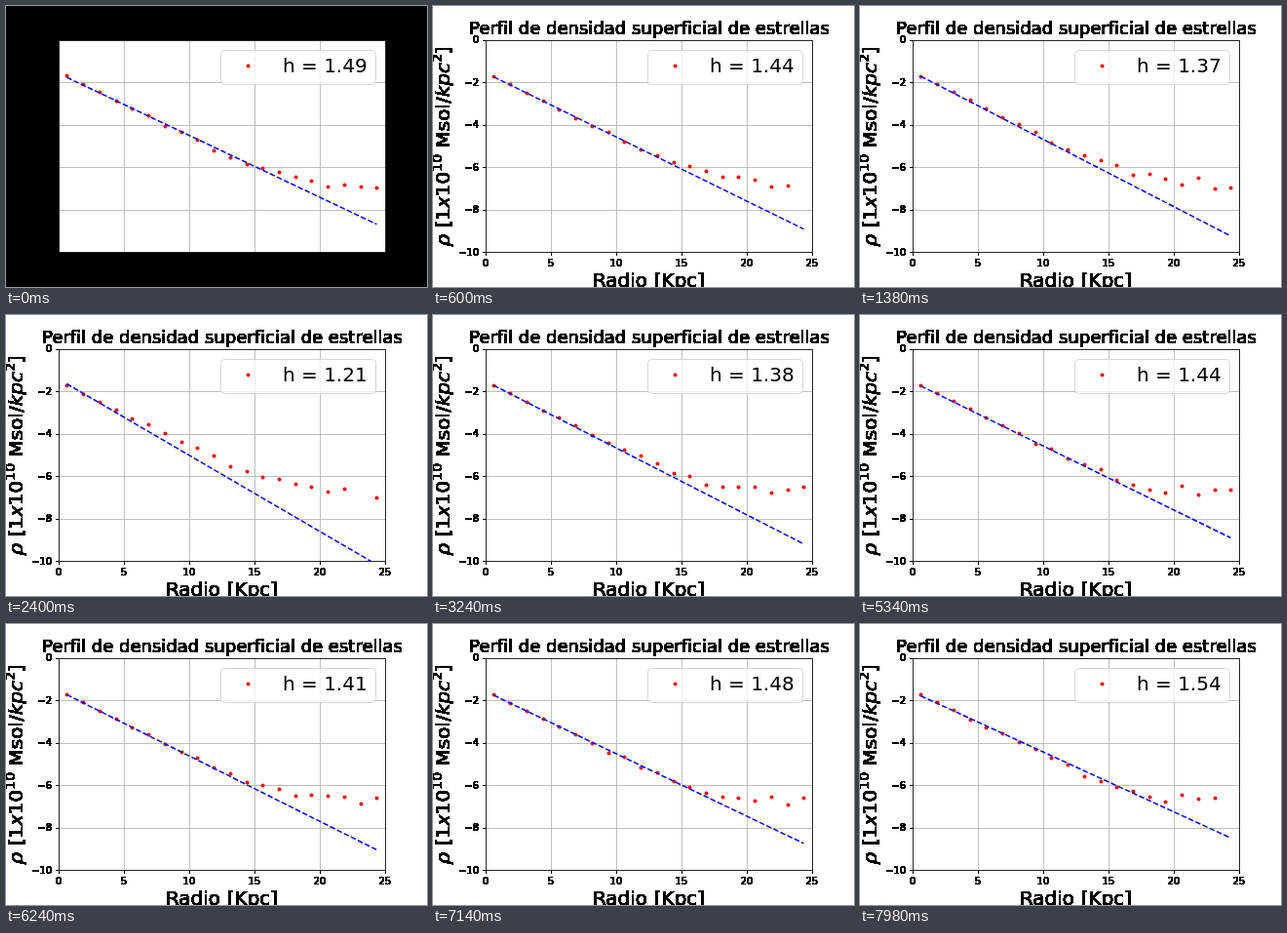
Write an HTML page that moves like this. It is 432 px wide and 288 px high and loops after 8 s.

```html
<!DOCTYPE html>
<html lang="es">
<head>
<meta charset="utf-8">
<title>Perfil de densidad</title>
<style>
  html, body { margin: 0; width: 100%; height: 100%; overflow: hidden; }
  svg { display: block; width: 432px; height: 288px; background: #000; font-family: "DejaVu Sans", sans-serif; font-variant-ligatures: none; }
  .grid { stroke: #b0b0b0; stroke-width: .8; }
  .ticks { stroke: #000; stroke-width: 1; }
  .small { font-size: 10px; }
  .large { font-size: 20px; }
  .sup { font-size: 14px; }
  .it { font-style: italic; }
</style>
</head>
<body>
<svg id="stage" viewBox="0 0 432 288">
  <defs>
    <clipPath id="axes"><rect x="54" y="35" width="335" height="217"/></clipPath>
    <!-- Turns soft text edges solid -->
    <filter id="hard" filterUnits="userSpaceOnUse" x="0" y="0" width="432" height="288">
      <feComponentTransfer><feFuncA type="linear" slope="60"/></feComponentTransfer>
    </filter>
  </defs>
  <rect x="54" y="35" width="335" height="217" fill="#fff"/>
  <g id="grid" class="grid"></g>
  <g clip-path="url(#axes)">
    <g id="dots" fill="#f00"></g>
    <line id="fit" stroke="#00f" stroke-width="1.5" stroke-dasharray="5.55 2.4"/>
  </g>
  <g id="ticks" class="ticks"></g>
  <rect x="54.5" y="35.5" width="335" height="217" fill="none" stroke="#262626"/>
  <g filter="url(#hard)">
    <g id="labels" class="small"></g>
    <text x="222" y="29" font-size="18" text-anchor="middle">Perfil de densidad superficial de estrellas</text>
    <text class="large" x="221.4" y="288" text-anchor="middle">Radio [Kpc]</text>
    <text class="large" transform="translate(17 144) rotate(-90)" text-anchor="middle"><tspan class="it">ρ</tspan> [1<tspan class="it">x</tspan>10<tspan class="sup" dy="-8">10</tspan><tspan dy="8"> Msol/</tspan><tspan class="it">kpc</tspan><tspan class="sup" dy="-8">2</tspan><tspan dy="8">]</tspan></text>
  </g>
  <rect x="220.5" y="45.5" width="159" height="35" rx="4" fill="#fff" fill-opacity=".8" stroke="#ccc" stroke-opacity=".8"/>
  <circle cx="248.5" cy="61.5" r="2" fill="#f00"/>
  <text id="legend" class="large" x="284" y="68"></text>
</svg>
<script>
const LOOP = 8000, STEP = 60, BINS = 20;
const UNIT_X = 13.392, UNIT_Y = 21.744;
const $ = id => document.getElementById(id);
const radiusX = r => 54 + UNIT_X * r;
const densityY = d => 34.56 - UNIT_Y * d;
const binX = k => radiusX(0.625 + 1.25 * k);
const pixelCentre = v => Math.round(v) + 0.5;

// Scale height over time in ms
const heights = [[0, 1.49], [1380, 1.37], [2400, 1.21], [3240, 1.38], [4440, 1.47], [6240, 1.41], [7980, 1.54]];

function set(node, attrs) {
  for (const name in attrs) node.setAttribute(name, attrs[name]);
  return node;
}

function add(parent, tag, attrs, text = "") {
  const node = set(document.createElementNS("http://www.w3.org/2000/svg", tag), attrs);
  node.textContent = text;
  return $(parent).appendChild(node);
}

for (let i = 0; i <= 5; i++) {
  const x = pixelCentre(radiusX(5 * i)), y = pixelCentre(densityY(-2 * i));
  add("grid", "line", { x1: x, x2: x, y1: 35, y2: 252 });
  add("grid", "line", { x1: 55, x2: 389, y1: y, y2: y });
  add("ticks", "line", { x1: x, x2: x, y1: 252, y2: 256 });
  add("ticks", "line", { x1: 51, x2: 55, y1: y, y2: y });
  add("labels", "text", { x: radiusX(5 * i), y: 267, "text-anchor": "middle" }, 5 * i);
  add("labels", "text", { x: 47, y: Math.round(densityY(-2 * i) + 3.8), "text-anchor": "end" }, i ? "−" + 2 * i : "0");
}
const dots = Array.from({ length: BINS }, (_, k) => add("dots", "circle", { cx: pixelCentre(binX(k)), r: 2 }));

// Seeded noise in -1..1
function noise(step, k) {
  const v = Math.sin(step * 12.9898 + k * 78.233) * 43758.5453;
  return 2 * (v - Math.floor(v)) - 1;
}

function scaleHeight(time) {
  const i = heights.findIndex(([t]) => t > time);
  if (i < 0) return heights.at(-1)[1];
  const [t0, h0] = heights[i - 1], [t1, h1] = heights[i];
  return h0 + (h1 - h0) * (time - t0) / (t1 - t0);
}

// Exponential disc that fades softly into a flat halo
function profileY(k) {
  const disc = 72 + 8.35 * k, halo = 182, blend = 14;
  return -blend * Math.log(Math.exp(-disc / blend) + Math.exp(-halo / blend));
}

function draw(step) {
  $("stage").style.background = step ? "#fff" : "#000";

  const h = scaleHeight(step * STEP);
  const startY = 70.5 + 9.5 * (h - 1.21);
  const drop = Math.LOG10E / h * 1.25 * (BINS - 1) * UNIT_Y;
  set($("fit"), { x1: binX(0), y1: startY, x2: binX(BINS - 1), y2: startY + drop });
  $("legend").textContent = "h = " + h.toFixed(2);

  dots.forEach((dot, k) => {
    const spread = 0.5 + 6 * (k / (BINS - 1)) ** 1.5;
    const empty = k >= BINS - 2 && noise(step, k + BINS) > 0.8;
    set(dot, {
      cy: pixelCentre(profileY(k) + spread * noise(step, k)),
      visibility: empty ? "hidden" : "visible"
    });
  });
}

let shown = -1;
const start = performance.now();
function tick(now) {
  const step = Math.floor(Math.max(0, now - start) % LOOP / STEP);
  if (step !== shown) draw(shown = step);
  requestAnimationFrame(tick);
}
tick(start);
</script>
</body>
</html>
```
